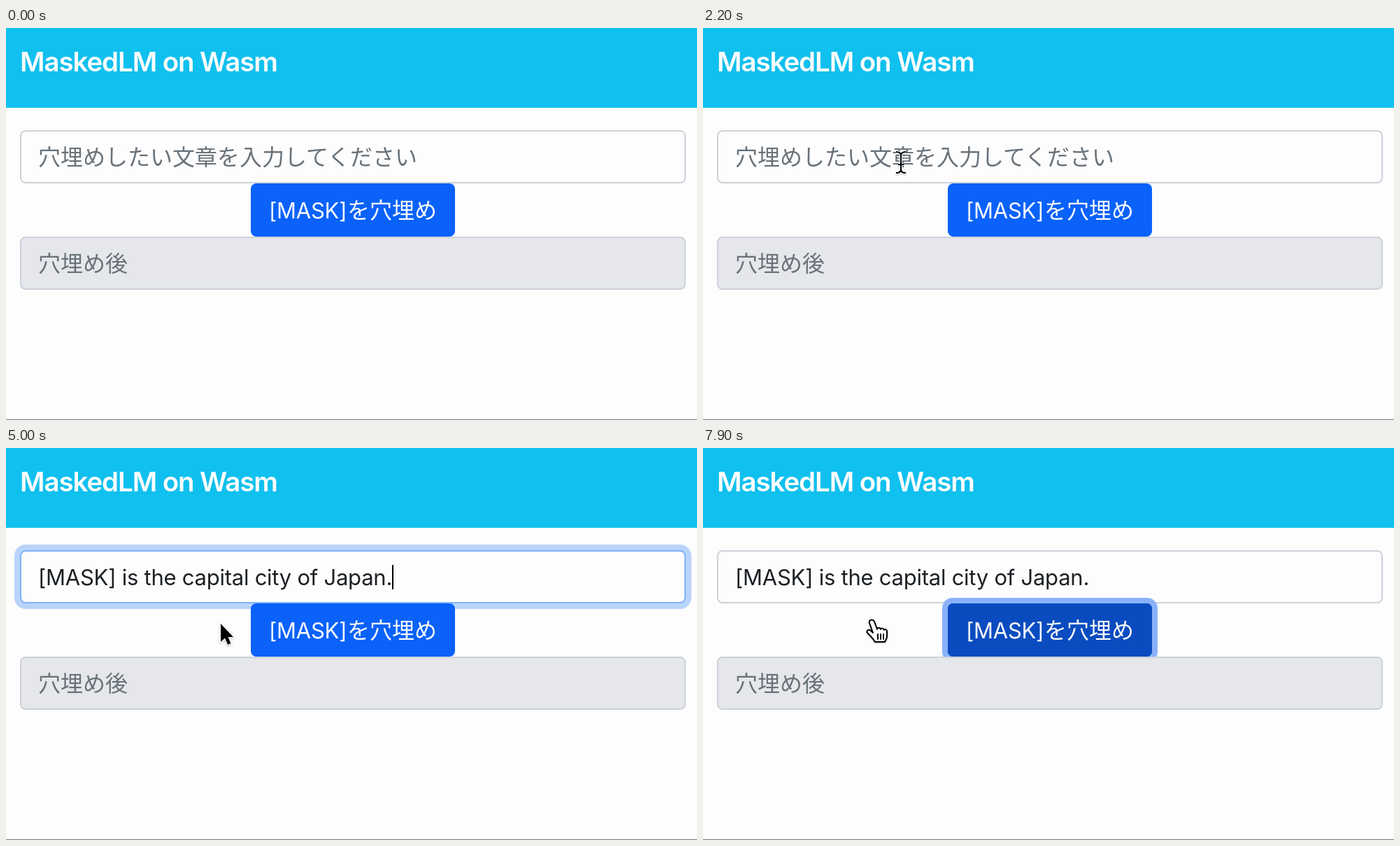
Recreate the animation shown at these times as an HTML page. Size 988 by 560 pixels, loop 8 s.

```html
<!DOCTYPE html>
<html lang="ja">
<head>
<meta charset="utf-8">
<title>MaskedLM on Wasm</title>
<style>
  html, body { margin: 0; width: 100%; height: 100%; overflow: hidden; background: #fdfdfd; }
  svg { display: block; }
  text { font: 32px "Noto Sans CJK JP", "Noto Sans CJK", sans-serif; }
  .latin { font: 31px Inter, "Liberation Sans", sans-serif; letter-spacing: -.25px; }
  .title { font: 600 38.5px Inter, "Liberation Sans", sans-serif; letter-spacing: -1.1px; }
  .hint { fill: #69727a; }
  .light { fill: #fdfdfd; }
  .field { stroke: #ccd2da; stroke-width: 2; }
  #arrow { stroke: #fff; stroke-width: 3; paint-order: stroke; stroke-linejoin: round; }
  #beam path { fill: none; stroke: #000; stroke-width: 2; }
  #beam .halo { stroke: #fff; stroke-width: 4; }
  #hand { fill: #fff; stroke: #000; stroke-width: 2; stroke-linejoin: round; stroke-linecap: round; }
  #cursor { filter: drop-shadow(0 1px 1px #0004); }
</style>
</head>
<body>
<svg width="988" height="560" viewBox="0 0 988 560">
  <rect width="988" height="114" fill="#10c0ee"/>
  <text class="title light" x="20" y="62">MaskedLM on Wasm</text>
  <rect y="559" width="988" height="1" fill="#777"/>

  <rect id="inputGlow" x="12" y="138" width="968" height="92" rx="16" fill="#b9d4fb"/>
  <rect class="field light" x="21" y="147" width="950" height="74" rx="7"/>
  <rect id="inputRing" x="21" y="147" width="950" height="74" rx="7" fill="none" stroke="#80b3fb" stroke-width="2"/>
  <text id="hint" class="hint" x="46" y="196">穴埋めしたい文章を入力してください</text>
  <text id="typed" class="latin" x="46" y="196" fill="#1c2024">[MASK] is the capital city of Japan.</text>
  <rect id="caret" y="167" width="2" height="35"/>

  <rect id="buttonGlow" x="342" y="214" width="308" height="92" rx="15" fill="#8ab2fa"/>
  <rect x="350" y="222" width="292" height="76" rx="8" fill="#0a62fb"/>
  <rect id="hover" x="350" y="222" width="292" height="76" rx="8" fill="#0a56cc"/>
  <rect id="active" x="350" y="222" width="292" height="76" rx="8" fill="#0a4cc0"/>
  <text class="latin light" x="376" y="272">[MASK]</text>
  <text class="light" x="488" y="272">を穴埋め</text>

  <rect class="field" x="21" y="299" width="950" height="74" rx="7" fill="#e5e7ea"/>
  <text class="hint" x="46" y="348">穴埋め後</text>

  <g id="cursor">
    <path id="arrow" d="M0 0V26L6 20.5L10 30L14.5 28L10.5 19H18Z"/>
    <g id="beam">
      <path class="halo" d="M-7 -15Q0 -15 0 -10V10Q0 15 -7 15M7 -15Q0 -15 0 -10M0 10Q0 15 7 15M-4 3H4"/>
      <path d="M-7 -15Q0 -15 0 -10V10Q0 15 -7 15M7 -15Q0 -15 0 -10M0 10Q0 15 7 15M-4 3H4"/>
    </g>
    <g id="hand">
      <path d="M-3 3C-4 -2 2 -3 4 1L8 12C8 9 12 9 13 12C13 10 17 10 18 13C19 11 22 12 22 15V22C22 26 20 27 19 30H5C3 26 -2 21 -6 17C-8 14 -4 11 -1 14L2 17Z"/>
      <path d="M9 19V26M13 19V26M17 19V26"/>
    </g>
  </g>
</svg>
<script>
const LOOP = 8000, STEP = 100;
const ENTER = 300, FOCUS = 2700, PASTE = 3750, HOVER = 5250, CLICK = 6350;
const el = id => document.getElementById(id);
const show = (id, on) => el(id).style.display = on ? '' : 'none';
const fade = (id, v) => el(id).style.opacity = v;
const clamp = v => Math.min(1, Math.max(0, v));
const ramp = (t, start) => clamp((t - start) / 150);

// time, x, y of the pointer's hot spot
const path = [
  [300, 338, 570], [800, 341, 496], [1300, 318, 400], [1800, 285, 225],
  [2100, 283, 192], [4400, 283, 192], [5000, 307, 251], [5500, 396, 266],
  [6900, 396, 266], [7500, 241, 247]
];

function pointer(t) {
  const i = path.findIndex(p => p[0] > t);
  if (i < 0) return path.at(-1).slice(1);
  if (i === 0) return path[0].slice(1);
  const [t0, x0, y0] = path[i - 1], [t1, x1, y1] = path[i];
  const u = (t - t0) / (t1 - t0), e = u * u * (3 - 2 * u);
  return [x0 + (x1 - x0) * e, y0 + (y1 - y0) * e];
}

function draw(t) {
  const [x, y] = pointer(t);
  const inInput = x > 20 && x < 972 && y > 146 && y < 222;
  const onButton = t >= CLICK || (x > 350 && x < 642 && y > 222 && y < 298);
  show('cursor', t >= ENTER);
  el('cursor').setAttribute('transform', `translate(${x} ${y})`);
  show('arrow', !inInput && !onButton);
  show('beam', inInput);
  show('hand', onButton);

  const pressed = ramp(t, CLICK), focused = ramp(t, FOCUS) - pressed;
  fade('inputGlow', focused);
  fade('inputRing', focused);
  fade('hover', ramp(t, HOVER));
  fade('active', pressed);
  fade('buttonGlow', pressed);

  const filled = t >= PASTE;
  show('hint', !filled);
  show('typed', filled);
  const blink = (t - (filled ? PASTE : FOCUS)) % 1000 < 500;
  show('caret', t >= FOCUS && t < CLICK && blink);
  el('caret').setAttribute('x', filled ? 552 : 46);
}

const start = performance.now();
function tick() {
  const t = (performance.now() - start) % LOOP;
  draw(Math.floor(t / STEP) * STEP);
  requestAnimationFrame(tick);
}
tick();
</script>
</body>
</html>
```
